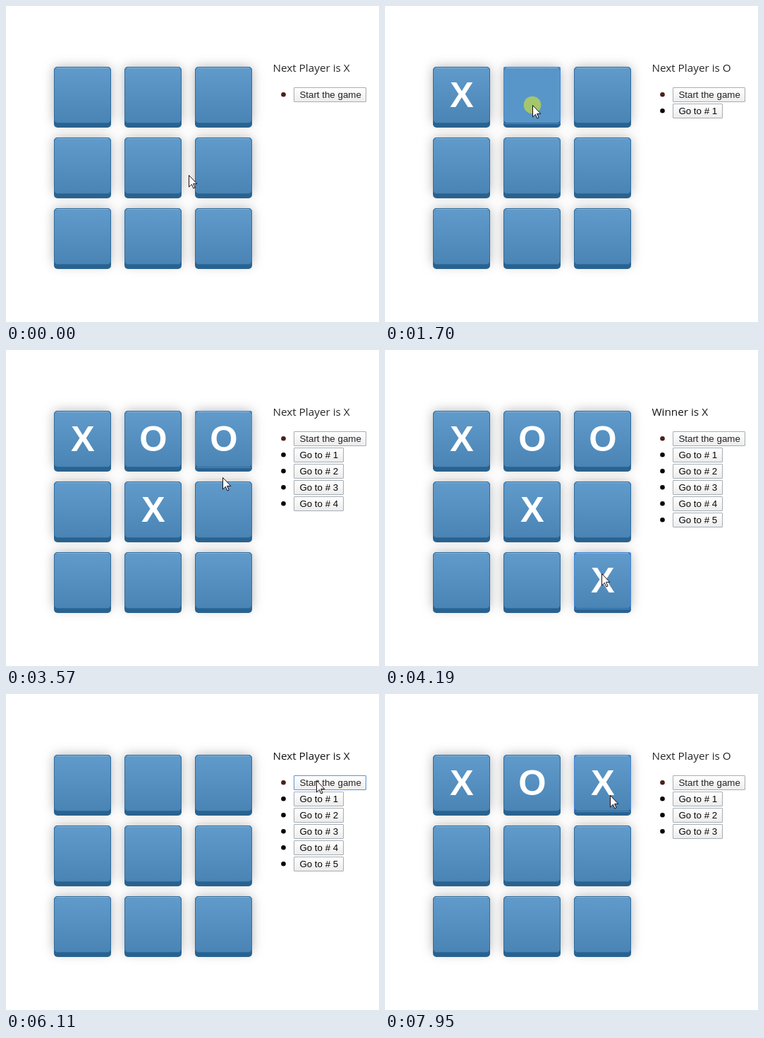
Write an HTML page that moves like this. It is 529x447 px and loops after 8 s.

```html
<!DOCTYPE html>
<html lang="en">
<head>
<meta charset="utf-8">
<title>Tic-tac-toe</title>
<style>
  html, body { margin: 0; width: 100%; height: 100%; overflow: hidden; background: #fff; }
  svg { display: block; }
  text { white-space: pre; }
  .mark { font: bold 50.5px "Liberation Sans", Arial, sans-serif; fill: #fff; text-anchor: middle; }
  .status { font: 15.3px "Open Sans", "Noto Sans", sans-serif; }
  .label { font: 13.333px "Liberation Sans", Arial, sans-serif; }
</style>
</head>
<body>
<svg id="stage" width="529" height="447" viewBox="0 0 529 447">
  <defs>
    <linearGradient id="face" x2="0" y2="1">
      <stop stop-color="#619bcb"/><stop offset="1" stop-color="#4984b4"/>
    </linearGradient>
    <linearGradient id="button" x2="0" y2="1">
      <stop stop-color="#fff"/><stop offset="1" stop-color="#ececec"/>
    </linearGradient>
    <filter id="blur" x="-40%" y="-40%" width="180%" height="180%">
      <feGaussianBlur stdDeviation="8"/>
    </filter>
  </defs>
</svg>
<script>
const LOOP = 8000, TICK = 77, LEAD_IN = 6;
const LEFT = 68, TOP = 86, PITCH = 100, SIZE = 81;
const LIST_X = 408, LIST_Y = 115, ROW = 23;
const stage = document.getElementById('stage');

function add(tag, attrs, parent = stage) {
  const node = document.createElementNS('http://www.w3.org/2000/svg', tag);
  for (const key in attrs) node.setAttribute(key, attrs[key]);
  return parent.appendChild(node);
}
const set = (node, key, value) => node.setAttribute(key, value);
const show = (node, on) => set(node, 'visibility', on ? 'visible' : 'hidden');

// Where the pointer goes; times are in ticks. What a press hits follows from its place.
const start = { x: 259, y: 239 };
const stops = [
  { x: 125, y: 58, at: 8 },
  { x: 117, y: 136, at: 10, press: 11 },
  { x: 209, y: 140, at: 16, press: 22 },
  { x: 209, y: 216, at: 29, press: 30 },
  { x: 307, y: 132, at: 37, press: 41 },
  { x: 307, y: 316, at: 52, press: 53 },
  { x: 440, y: 125, at: 62 },
  { x: 119, y: 138, at: 68 },
  { x: 370, y: 215, at: 70 },
  { x: 440, y: 139, at: 73 },
  { x: 440, y: 122, at: 76, press: 78 },
  { x: 99, y: 133, at: 86, press: 88 },
  { x: 209, y: 140, at: 92, press: 95 },
  { x: 319, y: 143, at: 100, press: 102 }
];

const RESET = -1;
const targetAt = ({ x, y }) => x >= LIST_X ? RESET
  : Math.floor((x - LEFT) / PITCH) + 3 * Math.floor((y - TOP) / PITCH);

// The pointer rests for two ticks after each release.
function pointerAt(tick) {
  let from = start, leave = 0;
  for (const stop of stops) {
    if (tick < leave) break;
    if (tick < stop.at) {
      const u = (tick - leave + 1) / (stop.at - leave + 1);
      const eased = u * u * (3 - 2 * u);
      const mix = key => Math.round(from[key] + (stop[key] - from[key]) * eased);
      return { x: mix('x'), y: mix('y') };
    }
    from = stop;
    leave = stop.press ? stop.press + 3 : stop.at + 1;
  }
  return from;
}

function gameAt(tick) {
  const game = { marks: Array(9).fill(''), moves: 0, rows: 0, focus: null, pressed: null };
  for (const stop of stops) {
    if (!stop.press) continue;
    if (tick < stop.press) break;
    const target = game.focus = targetAt(stop);
    if (tick === stop.press) {
      game.pressed = target;
    } else if (target === RESET) {
      game.marks.fill('');
      game.moves = 0;
    } else {
      game.marks[target] = game.moves % 2 ? 'O' : 'X';
      game.rows = ++game.moves;
    }
  }
  const m = game.marks;
  game.won = m[0] !== '' && m[0] === m[4] && m[4] === m[8];
  return game;
}

// Board
const places = Array.from({ length: 9 }, (_, i) =>
  ({ x: LEFT + i % 3 * PITCH, y: TOP + Math.floor(i / 3) * PITCH }));
for (const { x, y } of places) {
  add('rect', { x, y, width: SIZE, height: 80, rx: 5, fill: '#999', opacity: 0.75, filter: 'url(#blur)' });
}
const cells = places.map(({ x, y }) => {
  add('rect', { x, y, width: SIZE, height: 86, rx: 5, fill: '#2a628f' });
  const face = add('rect', { x: x + .5, y: y + .5, width: SIZE - 1, height: 79, rx: 4.5, stroke: '#2e6c9f' });
  add('path', { d: `M${x + 4} ${y + 1.5}h${SIZE - 8}`, stroke: '#83b5df' });
  const ring = add('rect', { x: x + .5, y: y + .5, width: SIZE - 1, height: 80, rx: 1, fill: 'none', stroke: '#4286da' });
  const mark = add('text', { x: x + 40.8, y: y + 57, class: 'mark' });
  return { face, ring, mark };
});

// Status and move list
const status = add('text', { x: 378.4, y: 93, class: 'status' });
const rows = Array.from({ length: 6 }, (_, i) => {
  const top = LIST_Y + i * ROW, width = i ? 71 : 103;
  const group = add('g', { transform: `translate(0 ${top})` });
  add('circle', { cx: 393.5, cy: 10.3, r: 3.3, fill: i ? '#0a060a' : '#4a201c' }, group);
  const box = add('rect', { x: LIST_X + .5, y: .5, width: width - 1, height: 20, rx: .5, fill: 'url(#button)' }, group);
  add('text', { x: LIST_X + 8.4, y: 15, class: 'label', fill: i ? '#080808' : '#262222' }, group)
    .textContent = i ? `Go to # ${i}` : 'Start the game';
  return { group, box, width, top };
});

// Pointer
const halo = add('circle', { r: 12.3, fill: '#ff0', opacity: 0.46 });
const pointer = add('path', {
  d: 'M.5 .5V17L4.4 13.3 6.9 19 9.1 18 6.6 12.4H11.8Z', fill: '#fff', stroke: '#1c0c10'
});

function render(t) {
  const tick = Math.floor((t - LEAD_IN) / TICK);
  const game = gameAt(tick);
  const { x, y } = pointerAt(tick);

  cells.forEach(({ face, ring, mark }, i) => {
    set(face, 'fill', game.pressed === i ? '#5896c9' : 'url(#face)');
    show(ring, game.focus === i);
    mark.textContent = game.marks[i];
  });

  status.textContent = game.won ? 'Winner is X' : `Next Player is ${game.moves % 2 ? 'O' : 'X'}`;
  set(status, 'fill', game.rows < 5 && game.focus !== RESET ? '#282828' : '#141414');

  rows.forEach(({ group, box, width, top }, i) => {
    const hover = x >= LIST_X && x < LIST_X + width && y >= top && y < top + 21;
    const focused = i === 0 && game.focus === RESET;
    show(group, i <= game.rows);
    set(box, 'stroke', focused ? '#5b93d8' : hover ? '#6f7780' : '#a6adb3');
  });

  show(halo, game.pressed !== null);
  for (const node of [halo, pointer]) set(node, 'transform', `translate(${x} ${y})`);
}

const began = performance.now();
function frame() {
  render((performance.now() - began) % LOOP);
  requestAnimationFrame(frame);
}
frame();
</script>
</body>
</html>
```
